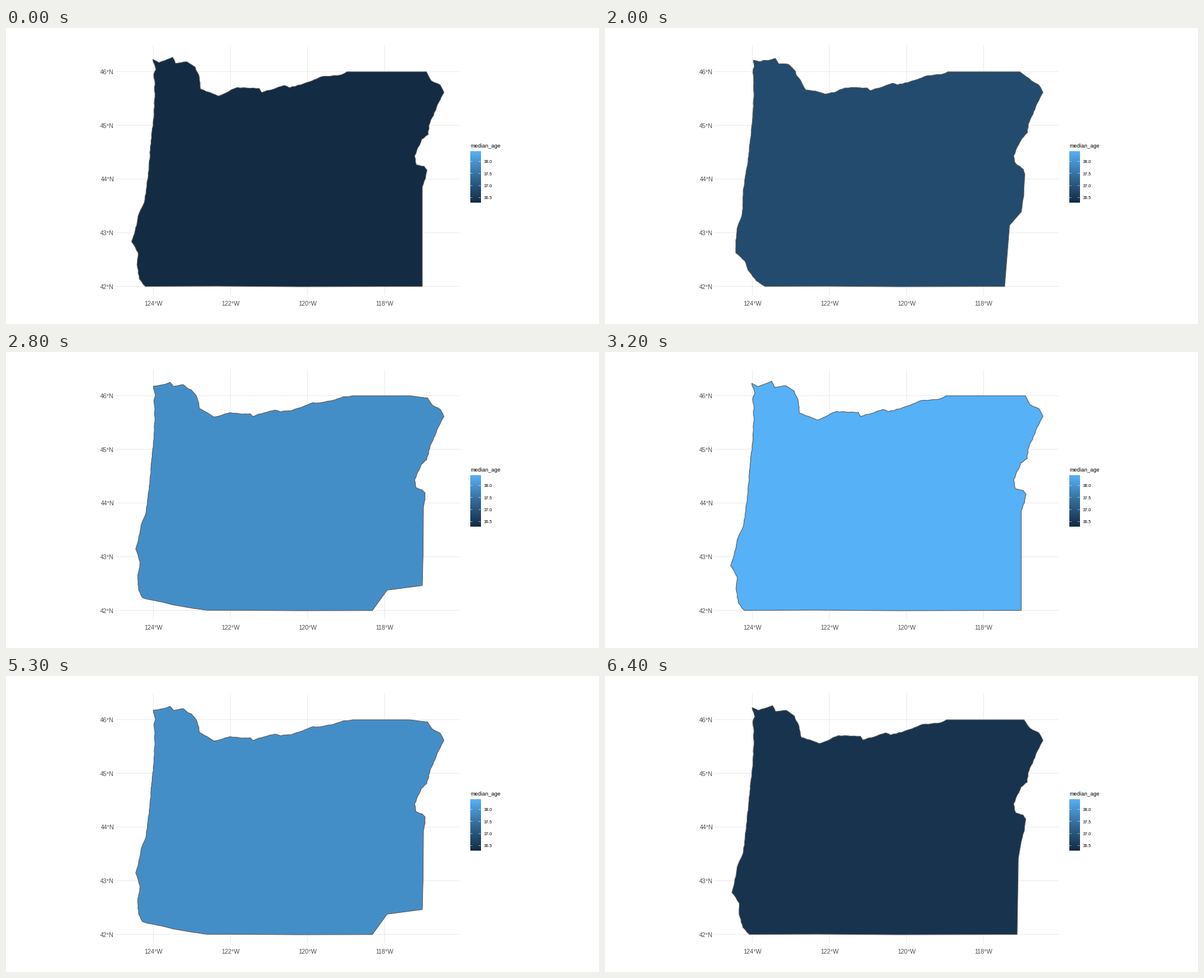
Animation of 1000 by 500 pixels, one loop 7.5 s. Source, as a matplotlib script:

```python
import numpy as np
import matplotlib.pyplot as plt
from matplotlib.animation import FuncAnimation
from matplotlib.colors import LinearSegmentedColormap
from matplotlib.patches import Polygon

WIDTH, HEIGHT, DPI = 1000, 500, 100
FRAMES, INTERVAL = 75, 100
STEPS = 16
PX = 72 / DPI
RAMP = LinearSegmentedColormap.from_list("age", ["#132B43", "#326A97", "#56B1F7"])

# Key points of the border, clockwise from the middle of the south side.
COAST = [
    (494, 437), (355, 436), (235, 436.5), (225, 424), (221, 400), (223, 380),
    (211.8, 361), (220.5, 333), (223, 317), (233.5, 294), (241, 240),
    (243.5, 200), (248, 160), (250.5, 132), (251, 90), (249, 79), (253, 70),
]
NORTH = [
    (247.5, 53), (258, 58.5), (281, 49.5), (286, 60), (305, 57), (319, 66),
    (326, 83), (328, 103), (358, 115), (390, 100.5), (427, 102), (431, 109),
    (469, 97), (478, 101), (502, 94), (533, 82), (564, 79.5), (575, 74),
]
EAST = [
    (709, 74), (717, 89), (732, 96), (738.5, 109), (726, 134), (713, 165),
    (712, 180), (701, 188), (689, 216), (692, 231), (705, 233.5), (710, 240),
    (707.5, 254), (702, 268.5), (702, 436.5), (494, 437),
]

# Which place on the border travels to which, counted in key points.
LINKS = np.array([
    (0, 0), (2, 0.86), (4, 1.44), (6, 1.9), (8, 3.8), (9.85, 6), (10.6, 8),
    (10.75, 9), (11.5, 9.4), (13, 13), (15.8, 17), (17, 18), (18.6, 20),
    (19, 21), (21, 22.5), (22.4, 24), (24, 25.4), (25.44, 28), (26.5, 29),
    (28, 30.7), (29, 32), (34, 34.1), (35, 34.72), (36, 35), (38, 38),
    (41.6, 40.6), (43, 43), (46, 48), (47, 48.62), (48, 49), (48.18, 49.38),
    (49, 49.54), (50, 50),
])

corners = np.array(COAST + NORTH + EAST, float)
lengths = np.hypot(*np.diff(corners, axis=0).T)
arc = np.concatenate([[0], np.cumsum(lengths)])


def roughen(step=5, size=0.7, straight=100):
    """Natural borders get small seeded wobbles, long surveyed lines stay straight."""
    rng = np.random.default_rng(4)
    marks, points = [], []
    for i, length in enumerate(lengths):
        count = 1 if length > straight else max(1, round(length / step))
        along = np.arange(count) / count
        edge = corners[i + 1] - corners[i]
        normal = np.array([-edge[1], edge[0]]) / length
        wobble = rng.uniform(-size, size, count) * (along > 0)
        marks.extend(arc[i] + along * length)
        points.extend(corners[i] + along[:, None] * edge + wobble[:, None] * normal)
    return np.array(marks + [arc[-1]]), np.array(points + [corners[-1]])


marks, border = roughen()


def at(position):
    return np.column_stack([np.interp(position, marks, axis) for axis in border.T])


# Both shapes share one set of vertices that holds the corners of each.
start_knots, end_knots = np.interp(LINKS.T, np.arange(len(arc)), arc)
start_arc = np.sort(np.concatenate(
    [marks, start_knots, np.interp(marks, end_knots, start_knots)]))
start_shape = at(start_arc)
end_shape = at(np.interp(start_arc, start_knots, end_knots))

plt.rcParams["font.family"] = "Liberation Sans"
fig = plt.figure(figsize=(WIDTH / DPI, HEIGHT / DPI), dpi=DPI, facecolor="white")
ax = fig.add_axes([0, 0, 1, 1])
ax.axis("off")


def label(x, y, text, size, color="black", ha="left"):
    ax.text(x, y, text, fontsize=size * PX, color=color, ha=ha, va="baseline")


def rule(xs, ys, color, width=1.07):
    ax.plot(xs, ys, color=color, lw=width * PX, solid_capstyle="butt", snap=False)


for i in range(4):
    x = 248.5 + 130 * i
    rule([x, x], [29.5, 451], "#EBEBEB")
    label(x, 468.7, f"{124 - 2 * i}°W", 10.2, "#4D4D4D", "center")
for i in range(5):
    y = 73.7 + 90.7 * i
    rule([185, 765], [y, y], "#EBEBEB")
    label(182.3, y + 4.3, f"{46 - i}°N", 10.2, "#4D4D4D", "right")

label(783, 202, "median_age", 9.2)
ax.imshow(np.linspace(1, 0, 256)[:, None], cmap=RAMP, vmin=0, vmax=1,
          extent=(783, 800.3, 294.8, 208.4), aspect="auto", interpolation="bilinear")
for i in range(4):
    y = 225.2 + 20.45 * i
    for x in (783, 796.8):
        rule([x, x + 3.5], [y, y], "white", 0.55)
    label(806, y + 2.9, f"{38 - i / 2:.1f}", 7.4)
ax.set_xlim(0, WIDTH)
ax.set_ylim(HEIGHT, 0)

state = ax.add_patch(Polygon(start_shape, closed=True, ec="#595959",
                             lw=1.07 * PX, joinstyle="round", zorder=3))


def progress(frame):
    rise = np.clip((frame - 16) / STEPS, 0, 1)
    fall = max(1 - (frame - 49) / STEPS, 1 / STEPS)
    return min(rise, fall)


def draw(frame):
    t = progress(frame)
    state.set_xy(start_shape + t * (end_shape - start_shape))
    state.set_facecolor(RAMP(float(t)))
    return (state,)


animation = FuncAnimation(fig, draw, frames=FRAMES, interval=INTERVAL,
                          repeat=True, repeat_delay=0)
plt.show()
```
